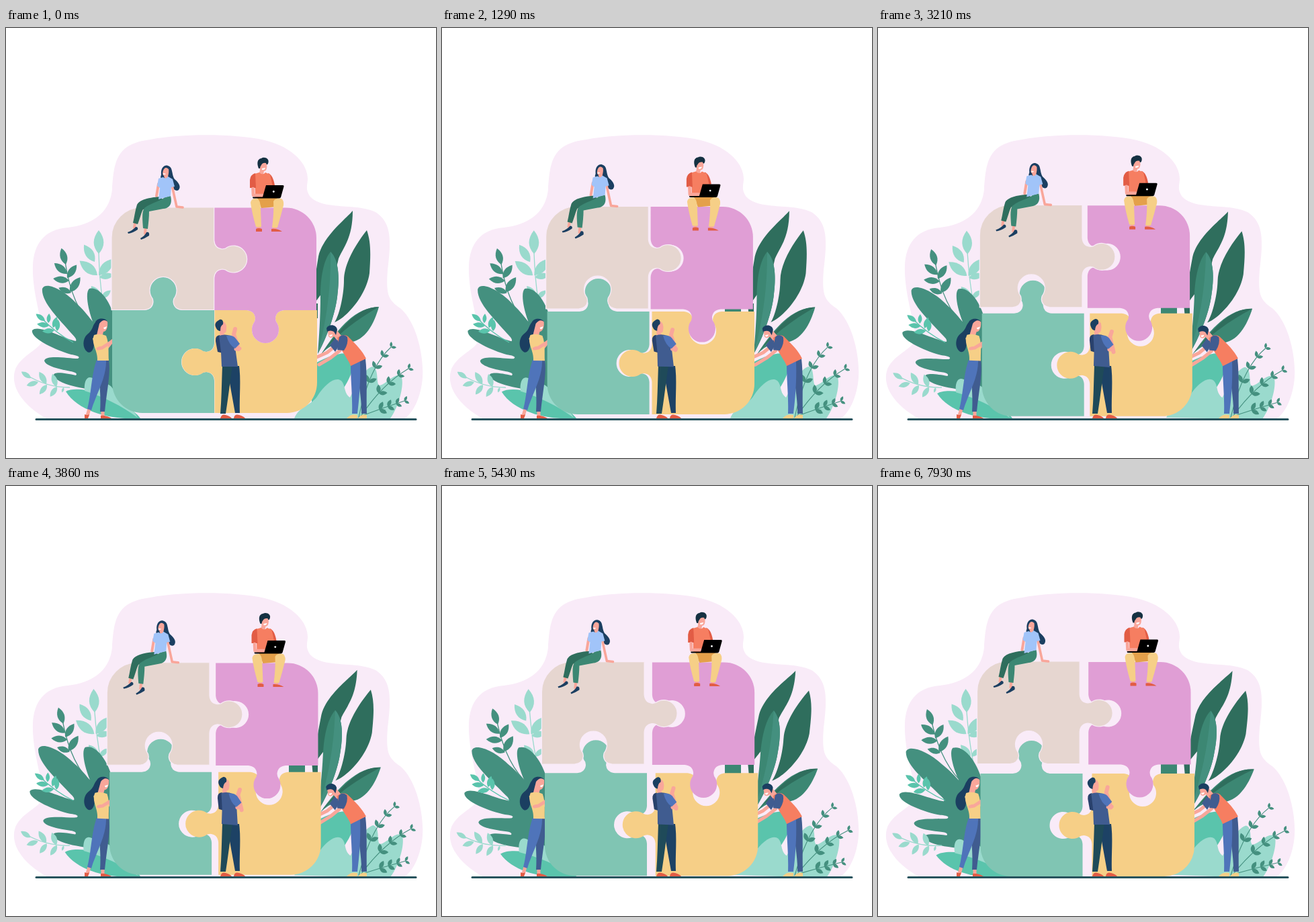
Animation, 640 px wide and 640 px high, one loop 8000 ms. Source, as an HTML page:

```html
<!DOCTYPE html>
<html lang="en">
<head>
<meta charset="utf-8">
<title>Team puzzle</title>
<style>
@property --drift { syntax: "<number>"; inherits: true; initial-value: 0 }
@property --sway { syntax: "<number>"; inherits: true; initial-value: 0 }
@property --bend { syntax: "<number>"; inherits: true; initial-value: 0 }
@property --tall { syntax: "<number>"; inherits: true; initial-value: 0 }
@property --lean { syntax: "<number>"; inherits: true; initial-value: 0 }
html, body { margin: 0; height: 100%; overflow: hidden; background: #fff }
svg {
  --ease: cubic-bezier(.37, 0, .63, 1);
  display: block; width: 100vw; height: 100vh;
  animation: drift 8s linear infinite, sway 8s var(--ease) infinite, bend 8s var(--ease) infinite,
    tall 8s var(--ease) infinite, lean 8s var(--ease) infinite;
}
@keyframes drift {
  0% { --drift: 0 } 16% { --drift: .25 } 28.6% { --drift: .44 } 40% { --drift: .6 }
  57% { --drift: .82 } 80%, 100% { --drift: 1 }
}
@keyframes sway { from { --sway: 0 } to { --sway: 1 } }
@keyframes bend { 0% { --bend: 0 } 90% { --bend: 1 } 100% { --bend: .97 } }
@keyframes tall { 0% { --tall: 0 } 68% { --tall: 1 } 100% { --tall: .8 } }
@keyframes lean { 0% { --lean: 0 } 45% { --lean: 1 } 90% { --lean: 0 } 100% { --lean: .1 } }

.slide { transform: translate(calc(var(--drift) * var(--x)), calc(var(--drift) * var(--y))) }
.nw { --x: -9.5px; --y: -6px } .ne { --x: 3.5px; --y: -5.5px }
.sw { --x: -5.5px; --y: 8px } .se { --x: 8px; --y: 8px }
.sway { transform: rotate(calc(var(--sway) * var(--a))) }
.bend { transform: rotate(calc(var(--bend) * var(--a))) }
.tall { transform: rotate(calc(var(--tall) * -3.2deg)); transform-origin: 155px 470px }
.lean { transform: rotate(calc(var(--lean) * var(--a))) }
.reach { transform: translate(calc(var(--lean) * 3px), calc(var(--lean) * 3px)) }

.limb { fill: none; stroke: #f9a69a; stroke-width: 5; stroke-linecap: round; stroke-linejoin: round }
.skin { fill: #f9a69a } .navy { fill: #1b3f61 } .blue { fill: #4f74ba } .slate { fill: #405c90 }
.orange { fill: #f67e61 } .red { fill: #e25c45 } .sand { fill: #f6cf87 }
.deep { fill: #2f6e5d } .leaf { fill: #44907f } .mid { fill: #3c8773 }
.teal { fill: #5ac4ac } .mint { fill: #9adacd }
.smile { fill: #fff }
</style>
</head>
<body>
<svg viewBox="0 0 640 640">
  <path fill="#f9ebf8" d="M62 582C30 565 10 540 12 517C14 490 48 481 54 466C60 450 38 400 40 352C42 322 56 300 92 297C135 292 155 270 158 240C161 200 163 172 215 166C260 157 340 157 385 167C430 178 450 205 449 226C448 236 446 240 452 250C470 272 520 260 550 274C575 290 573 318 568 360C565 400 570 405 588 418C612 440 622 490 620 520C618 550 605 575 592 582Z"/>

  <!-- left plants -->
  <g class="tall" id="tallSprig"></g>
  <g class="sway" style="--a:-4.8deg;transform-origin:130px 445px" id="darkSprig"></g>
  <path class="leaf sway" style="--a:-4.8deg;transform-origin:140px 540px" d="M165 548C130 536 88 536 72 520C66 510 86 513 104 517C107 514 102 512 96 511C80 508 58 503 57 495C60 486 92 492 107 492C112 489 104 487 97 486C75 480 36 462 39 450C48 440 85 462 104 466C106 462 100 458 96 453C80 434 52 408 54 388C58 377 85 388 106 411C118 422 124 431 129 437C121 415 118 393 124 388C140 384 160 410 165 450Z"/>
  <g class="sway" style="--a:-4.8deg;transform-origin:100px 470px" id="tealSprig"></g>
  <g class="sway" style="--a:-4.2deg;transform-origin:95px 537px" id="mintSprig"></g>
  <g class="sway" style="--a:-4.6deg;transform-origin:195px 577px">
    <path class="teal" d="M89 541C102 533 140 540 168 556C185 566 195 574 200 581C160 584 108 572 89 541Z"/>
    <path class="mint" d="M117 540C116 528 119 520 125 520C133 520 136 531 143 530C152 527 160 535 163 545C175 552 190 568 196 580C172 562 145 549 117 540Z"/>
  </g>

  <!-- right plants -->
  <path class="mid" d="M421 410H445V432H421Z"/>
  <path class="deep" d="M455 410H464V432H457Z"/>
  <path class="deep bend" style="--a:3.3deg;transform-origin:463px 480px" d="M516 272C505 285 472 310 465 340C461 365 456 395 456 415C472 390 489 375 495 343C503 325 516 312 516 272Z"/>
  <path class="deep bend" style="--a:3.4deg;transform-origin:475px 480px" d="M537 301C522 320 503 350 503 375C503 400 495 430 489 438C505 432 536 400 541 365C543 335 543 318 537 301Z"/>
  <g class="bend" style="--a:4.9deg;transform-origin:470px 480px">
    <path class="mid" d="M483 333C473 345 468 370 468 400C468 430 466 460 464 485C478 460 490 425 493 400C497 370 495 345 483 333Z"/>
    <path class="leaf" d="M483 333C484 390 476 440 464 485C478 460 490 425 493 400C497 370 495 345 483 333Z"/>
  </g>
  <g class="bend" style="--a:5deg;transform-origin:480px 475px">
    <path class="mid" d="M555 415C525 416 500 437 468 487C485 468 495 470 510 468C535 466 548 440 555 415Z"/>
    <path class="deep" d="M555 415C525 416 505 437 468 487C492 456 522 434 555 415Z"/>
  </g>
  <g class="bend" style="--a:2deg;transform-origin:500px 580px">
    <path class="teal" d="M455 502C475 490 500 480 516 486C522 500 512 522 500 540L455 570Z"/>
    <path class="mint" d="M429 581C437 562 455 562 464 547C475 530 490 518 499 525C506 532 502 543 512 550C522 530 532 508 545 504C556 506 550 530 556 532C566 530 576 514 588 517C594 530 584 565 572 581Z"/>
  </g>
  <g class="bend" style="--a:4.9deg;transform-origin:525px 580px" id="fronds"></g>

  <!-- woman pushing -->
  <g>
    <path class="limb" d="M126 560L121 577M144 565L144 577"/>
    <path class="slate" d="M138 494H153C156 515 150 540 147 571H140C142 540 137 520 138 494Z"/>
    <path class="blue" d="M135 494H149C150 520 134 545 127 569L121 567C127 545 127 515 135 494Z"/>
    <path class="red" d="M117 575Q121 577 124 575L122 581H117ZM141 577Q148 576 157 581H141Z"/>
    <g class="lean" style="--a:2.2deg;transform-origin:140px 495px">
      <path class="navy" d="M133 438C136 431 148 431 151 437L146 450C139 458 133 460 131 470C131 480 125 485 121 482C113 476 114 462 121 456C130 449 128 444 133 438Z"/>
      <path class="skin" d="M139 440Q145 432 151 437C152 446 149 452 145 452L143 460L135 457Z"/>
      <path class="smile" d="M145 446L150 444Q149 449 146 448Z"/>
      <path class="limb" d="M150 476L158 466"/>
      <path class="sand" d="M131 457Q140 454 149 458C154 470 152 485 153 495H136C137 480 126 470 131 457Z"/>
      <path class="limb" d="M137 477L143 476L157 467"/>
      <path class="sand" d="M129 462L135 457Q142 463 142 472L133 477Z"/>
    </g>
  </g>

  <!-- man pushing -->
  <g>
    <path class="slate" d="M523 497L535 492C538 520 536 545 537 574H529C530 550 522 520 523 497Z"/>
    <path class="blue" d="M513 502L527 496C528 525 526 550 523 574H515C516 550 513 525 513 502Z"/>
    <path class="sand" d="M507 581Q513 574 523 576V581ZM524 581Q529 574 537 576V581Z"/>
    <g class="lean" style="--a:-1deg;transform-origin:525px 497px">
      <path class="limb" d="M488 475L478 483L458 492"/>
      <path class="slate" d="M482 472L492 459L500 466L490 482Z"/>
      <path class="skin" d="M479 451L490 447L500 459L493 465L488 459Q483 463 480 459Z"/>
      <path class="navy" d="M477 447C480 440 492 441 493 449L491 457L488 452Q483 449 478 452Z"/>
      <path class="smile" d="M481 457L486 456Q485 460 482 459Z"/>
      <path class="orange" d="M493 461Q502 454 509 459C522 472 530 480 536 492L513 503C508 490 498 482 493 461Z"/>
      <path class="limb" d="M497 480L483 491L466 501"/>
      <path class="slate" d="M496 460Q502 454 508 460Q510 470 503 480L493 479Z"/>
    </g>
  </g>

  <!-- puzzle -->
  <path class="slide sw" fill="#80c5b3" d="M158 420H206q12-1 13-12q-.5-4-1-5a20 20 0 1 1 32 0q-.5 1-1 5q1 11 13 12H310V469q-1 12-12 13q-4-.5-5-1a20 20 0 1 0 0 32q1-.5 5-1q11 1 12 13V573H203a45 45 0 0 1-45-45Z"/>
  <path class="slide se sand" d="M310.5 420H358q12 1 13 12q-.5 4-1 5a20 20 0 1 0 32 0q-.5-1-1-5q1-11 13-12H463V528a45 45 0 0 1-45 45H310.5V525q-1-12-12-13q-4 .5-5 1a20 20 0 1 1 0-32q1 .5 5 1q11-1 12-13Z"/>
  <path class="slide ne" fill="#e09ed5" d="M309.7 267.5H417a45 45 0 0 1 45 45V420H414q-12 1-13 12q.5 4 1 5a20 20 0 1 1-32 0q.5-1 1-5q-1-11-13-12H309.7V372q1-12 12-13q4 .5 5 1a20 20 0 1 0 0-32q-1 .5-5 1q-11-1-12-13Z"/>
  <path class="slide nw" fill="#e6d6d0" stroke="#f9ebf8" stroke-width="1.2" d="M157 419.5V312a45 45 0 0 1 45-45H309.7V316q1 12 12 13q4-.5 5-1a20 20 0 1 1 0 32q-1-.5-5-1q-11 1-12 13V419.5H262q-12-1-13-12q.5-4 1-5a20 20 0 1 0-32 0q.5 1 1 5q-1 11-13 12Z"/>

  <!-- woman sitting -->
  <g class="slide nw">
    <path class="limb" d="M227 232L224 250" style="stroke-width:4"/>
    <path class="limb" d="M193 285L191 297M208 294L207 306" style="stroke-width:4"/>
    <path class="deep" d="M230 251C215 252 199 255 195 263C192 272 191 282 189 290L196 292C200 282 201 275 204 270L240 264Z"/>
    <path class="mid" d="M245 250C248 262 243 268 234 269L213 273C213 282 212 290 211 299L204 298C203 285 202 273 206 268C216 260 230 258 236 252Z"/>
    <path class="navy" d="M181 304Q189 301 193 296Q197 296 196 300Q189 305 182 306ZM200 313Q207 309 209 304Q214 303 213 309Q207 313 201 315Z"/>
    <path class="navy" d="M231 218C230 208 236 203 241 205C249 207 246 218 251 225C257 230 261 236 257 241C253 244 248 240 246 232L231 224C229 222 231 220 231 218Z"/>
    <path class="limb" d="M247 234L250 248L254 266L263 267" style="stroke-width:3.6"/>
    <path class="skin" d="M234 212Q237 205 242 210C243 216 241 219 241 223L237 227L235 220Q232 218 234 212Z"/>
    <path class="smile" d="M234 216L238 217Q236 219 234 218Z"/>
    <path fill="#a1c4f9" d="M227 224L234 222Q238 226 241 221L248 225L251 236L246 237L245 250L227 255L229 238L225 235Z"/>
  </g>

  <!-- man sitting -->
  <g class="slide ne">
    <path class="skin" d="M377 203Q382 196 388 200C389 208 388 213 384 213L383 218H376L378 212Z"/>
    <path fill="#153142" d="M376 209C373 201 374 195 380 194C384 191 392 194 390.500 200C390 203 388 205 387 201Q382 200 380 204Q378 206 378 209Z"/>
    <path class="smile" d="M381 209L386 208Q385 212 381 211Z"/>
    <path class="red" d="M390 216Q397 218 400 234L392 235Z"/>
    <path class="orange" d="M370 217L377 215Q382 220 386 215L393 218L397 236L394 252H371Z"/>
    <path class="red" d="M371 216Q364 218 363 226V238H372Z"/>
    <path class="limb" d="M367.500 239L368 249L382 249" style="stroke-width:4.6"/>
    <path fill="#e4a04a" d="M374 253H404V266L380 268Z"/>
    <path class="limb" d="M376 294V300M400 294V300"/>
    <path class="sand" d="M364 260Q365 253 374 254Q379 256 379 270L380 296H372Q366 275 364 260ZM398 258Q401 252 410 254Q414 257 413 264Q409 280 404 297H396Q399 275 398 258Z"/>
    <path class="red" d="M372 299Q376 297 381 299V303H372ZM395 299Q403 298 411 303H395Z"/>
    <path d="M387 234H412Q414 234 413.500 236L409 252Q408 253.500 406 253.500H368Q366 252 368 251.500H382Z"/>
    <circle class="smile" cx="398.300" cy="243.500" r="1.400"/>
  </g>

  <path d="M45 582.500H610" stroke="#27535d" stroke-width="3" stroke-linecap="round"/>

  <!-- man in the middle -->
  <g>
    <path class="red" d="M319 581Q321 574 327 576Q334 578 336 581ZM339 581Q340 574 347 576Q354 578 356 581Z"/>
    <path d="M329 503H347C350 525 347 550 348 573H341C337 550 332 525 329 503Z" fill="#1d4265"/>
    <path d="M322 503H337C333 530 330 555 327 574H319C321 550 321 525 322 503Z" fill="#1f4a59"/>
    <g class="lean" style="--a:4.5deg;transform-origin:333px 503px">
      <path class="skin" d="M317 443L324 437Q329 440 328 449Q328 454 324 454L328 460H319Z"/>
      <path class="navy" d="M313 447C309 440 313 437 318 434C322 433 324 437 323 441Q319 443 319 451Q315 451 313 447Z"/>
      <g class="reach"><path class="limb" d="M346 478L339 456L341 448" style="stroke-width:6"/></g>
      <path fill="#29416c" d="M318 457Q311 458 312 466L315 482L323 484Z"/>
      <path class="slate" d="M317 458Q326 455 334 458L341 475L345 504H321L320 482Z"/>
      <path class="limb" d="M342 478L348 477"/>
      <path class="blue" d="M328 458Q336 456 341 461L348 470L341 477Q332 472 328 458Z"/>
    </g>
  </g>
</svg>
<script>
const leafPath = (x, y, angle, len, wide = .28) => {
  const w = len * wide;
  return `<path transform="translate(${x} ${y}) rotate(${angle})" d="M0 0C${-w} ${-len * .3} ${-w} ${-len * .65} 0 ${-len}C${w} ${-len * .65} ${w} ${-len * .3} 0 0"/>`;
};
const stemPath = (d, color, width = 1.3) =>
  `<path d="${d}" fill="none" stroke="${color}" stroke-width="${width}"/>`;

// Each leaf is [base x, base y, angle, length].
function sprig(id, color, stem, leaves) {
  document.getElementById(id).innerHTML = stemPath(stem, color) +
    `<g fill="${color}">${leaves.map(l => leafPath(...l)).join("")}</g>`;
}
sprig("tallSprig", "#9adacd", "M138 335Q140 410 157 470", [
  [138, 336, 0, 35], [132, 348, -32, 30], [136, 368, -51, 34], [138, 368, 42, 33],
  [139, 371, 80, 22], [141, 402, -38, 23], [140, 398, -80, 14], [142, 402, 50, 18]]);
sprig("darkSprig", "#44907f", "M88 348Q98 415 130 445", [
  [89, 352, -15, 25], [91, 366, -50, 25], [94, 376, -83, 24], [97, 394, -69, 20],
  [91, 372, 36, 24], [95, 393, 35, 27]]);
sprig("tealSprig", "#5ac4ac", "M50 429Q75 455 100 468", [
  [58, 436, -52, 17], [64, 443, -82, 18], [72, 450, -95, 18], [63, 439, 5, 14],
  [70, 446, 20, 17], [76, 451, 5, 17]]);
sprig("mintSprig", "#9adacd", "M30 516Q60 535 95 535", [
  [37, 521, -56, 17], [48, 527, -106, 18], [61, 531, -142, 18], [76, 534, -145, 18],
  [60, 530, -30, 21], [75, 534, -17, 20], [86, 535, -160, 8]]);

// A thin curved stem with paired leaves along its upper part.
function frond(x0, y0, cx, cy, x1, y1, pairs) {
  let leaves = "";
  for (let i = 0; i <= pairs; i++) {
    const t = .4 + .6 * i / pairs, s = 1 - t;
    const x = s * s * x0 + 2 * s * t * cx + t * t * x1;
    const y = s * s * y0 + 2 * s * t * cy + t * t * y1;
    const dx = s * (cx - x0) + t * (x1 - cx), dy = s * (cy - y0) + t * (y1 - cy);
    const heading = Math.atan2(dx, -dy) * 180 / Math.PI, len = 16 - 8 * t;
    leaves += leafPath(x, y, heading - 45, len, .33) + leafPath(x, y, heading + 45, len, .33);
  }
  return stemPath(`M${x0} ${y0}Q${cx} ${cy} ${x1} ${y1}`, "#44907f", 1.1) + `<g class="leaf">${leaves}</g>`;
}
document.getElementById("fronds").innerHTML =
  frond(525, 580, 540, 505, 573, 475, 3) +
  frond(528, 578, 560, 530, 599, 507, 3) +
  frond(530, 577, 562, 565, 593, 555, 3);
</script>
</body>
</html>
```
